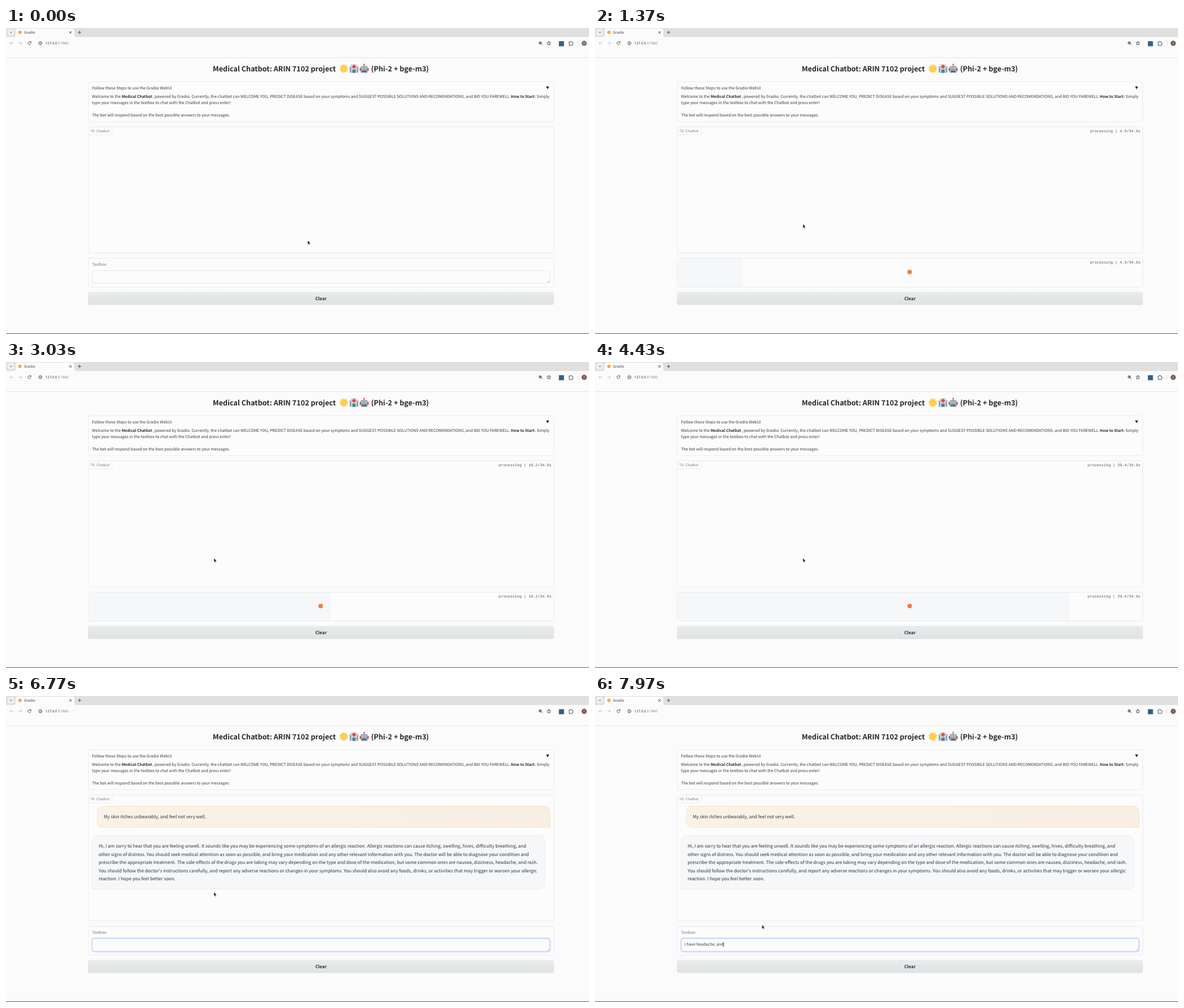
An HTML page for the animation above (8 s loop, 1032 by 543 pixels).

```html
<!DOCTYPE html>
<html lang="en">
<head>
<meta charset="utf-8">
<title>Medical Chatbot</title>
<style>
  html, body { margin: 0; width: 100%; height: 100%; overflow: hidden; background: #fbfbfb; }
  svg { display: block; width: 1032px; height: 543px; }
  text {
    font-family: "Noto Sans CJK SC", "Noto Sans CJK JP", "Noto Sans CJK", "Noto Sans", sans-serif;
    font-size: 7.04px; fill: #3a3a40; white-space: pre; text-rendering: geometricPrecision;
  }
  .ui { font-family: "Noto Sans", "Open Sans", sans-serif; }
  .bold { font-weight: 700; font-size: 6.75px; fill: #2b2b30; }
  .title { font-weight: 700; font-size: 12.62px; fill: #27272a; }
  .chat { font-size: 8.02px; fill: #303036; }
  .gray { fill: #74777f; }
  .mono { font-family: "Liberation Mono", "DejaVu Sans Mono", monospace; font-size: 6.78px; fill: #50525a; text-anchor: end; }
  .block { fill: #fcfcfc; stroke: #ebebee; }
  .line { fill: none; stroke: #45464a; stroke-linecap: round; stroke-linejoin: round; }
</style>
</head>
<body>
<svg viewBox="0 0 1032 543">
  <defs>
    <linearGradient id="btn" x2="0" y2="1">
      <stop stop-color="#e9ebec"/><stop offset="1" stop-color="#dfe2e3"/>
    </linearGradient>
    <linearGradient id="peach" x2="1" y2="0">
      <stop stop-color="#fbf2e7"/><stop offset="1" stop-color="#f8eee4"/>
    </linearGradient>
  </defs>
  <rect width="1032" height="543" fill="#fbfbfb"/>

  <!-- browser bar -->
  <rect width="1032" height="16" fill="#dfe0df"/>
  <path d="M14 16q3 0 3-3V5q0-4 4-4h96q4 0 4 4v8q0 3 3 3z" fill="#fbfbfb"/>
  <rect x="3" y="2" width="11" height="11" rx="3" fill="#f0f0ef"/>
  <path class="line" d="M7 7l1.7 1.7L10.4 7M112.3 6l3.6 3.6m0-3.6l-3.6 3.6M127.7 7.8h5m-2.5-2.5v5"/>
  <circle cx="24.7" cy="7.8" r="3" fill="#f5ac3c"/>
  <text class="ui" x="31.7" y="10.2" style="font-size:6.3px">Gradio</text>
  <g class="line" stroke-width=".9">
    <path d="M12.5 27H7.2m2.4-2.4L7.2 27l2.4 2.4M22.5 27h5.3m-2.4-2.4l2.4 2.4-2.4 2.4" style="stroke:#c0c0c6"/>
    <path d="M43.8 25.4a2.7 2.7 0 1 0 .3 2.4M44.2 24v1.8h-1.8"/>
    <circle cx="60.7" cy="27" r="2.8"/><path d="M60.7 26.7v1.6m0-2.8v.1"/>
    <circle cx="945.6" cy="26.4" r="2.2"/><path d="M947.3 28.1l2 2m-4.7-3.7h2m-1-1v2"/>
    <path d="M961 23.8l1 2.2 2.3.2-1.8 1.6.6 2.4-2.1-1.3-2.1 1.3.6-2.4-1.8-1.6 2.3-.2z"/>
    <path d="M996.8 25h1.8q0-1.6 1.2-1.6T1001 25h1.9v2q1.3 0 1.3 1t-1.3 1v2h-6.1v-1.7q1.2-.2 1.2-1.2t-1.2-1.2z"/>
  </g>
  <text class="ui" x="69.8" y="29.2" style="font-size:6.04px">127.0.0.1<tspan fill="#85858c">:7860</tspan></text>
  <rect x="978.7" y="23.4" width="9" height="9" fill="#2f6382"/>
  <path d="M1012.5 23v8" stroke="#dcdce6"/>
  <circle id="avatar" cx="1023.5" cy="27.2" r="4.6"/>
  <text class="ui" x="1023.5" y="29" text-anchor="middle" style="font-size:5px;fill:#d8cbc6">Z</text>
  <path d="M0 52.5h1032" stroke="#e3e3ea"/>
  <path d="M0 542.5h1032" stroke="#5c5c58"/>

  <!-- heading -->
  <text class="title" x="366" y="76.5">Medical Chatbot: ARIN 7102 project</text>
  <text class="title" x="748.6" y="76.5" text-anchor="end">(Phi-2 + bge-m3)</text>
  <g transform="translate(598 72)">
    <path id="rays" stroke="#f8b945" stroke-width="1.5" stroke-linecap="round"/>
    <path id="star" fill="#fdd53f" stroke="#fcc834" stroke-width="1.6" stroke-linejoin="round"/>
  </g>
  <g transform="translate(616 72)">
    <path d="M-7.8-2.600h15.600V7.600H-7.800z" fill="#b0bfc7"/>
    <path d="M-5.500-7.600h11V7.600h-11z" fill="#c8d3d8"/>
    <path d="M-7.800-3.400h2.300v1.600h-2.300zm13.300 0h2.300v1.600H5.500z" fill="#82969f"/>
    <path d="M-1.200-6.800h2.400v2.200h2.200v2.400H1.200V0h-2.400v-2.200h-2.200v-2.400h2.200z" fill="#e53935"/>
    <path d="M-6.900 0h1.600v2.200h-1.600zm0 3.600h1.600v2.200h-1.600zM5.300 0h1.600v2.200H5.300zm0 3.600h1.600v2.200H5.300zM-2.800 2h5.600v5.600h-5.600z" fill="#4c7f98"/>
  </g>
  <g transform="translate(634 72)">
    <path d="M0-7v3" stroke="#8197a2" stroke-width="1.4"/>
    <circle cy="-7" r="1.4" fill="#e5574f"/>
    <path d="M-8-1h16v5H-8z" fill="#c44f4a"/>
    <rect x="-6.2" y="-4.6" width="12.4" height="12.4" rx="2" fill="#90a4ae"/>
    <circle cx="-2.8" cy="-1" r="1.8" fill="#f3f7f8"/><circle cx="2.8" cy="-1" r="1.8" fill="#f3f7f8"/>
    <circle cx="-2.8" cy="-1" r=".9" fill="#d34b45"/><circle cx="2.8" cy="-1" r=".9" fill="#d34b45"/>
    <path d="M-3.8 4h7.6v2h-7.6z" fill="#455a64"/>
  </g>

  <!-- instructions -->
  <rect class="block" x="145.5" y="95.5" width="824" height="70.5" rx="4"/>
  <text x="152.3" y="108.5">Follow these Steps to use the Gradio WebUI</text>
  <path d="M956 103.8h5.4l-2.7 5z" fill="#202024"/>
  <text x="152.3" y="123.8">Welcome to the</text>
  <text class="bold" x="204.8" y="123.8">Medical Chatbot</text>
  <text x="259.4" y="123.8">, powered by Gradio. Currently, the chatbot can WELCOME YOU, PREDICT DISEASE based on your symptoms and SUGGEST POSSIBLE SOLUTIONS AND RECOMENDATIONS, and BID YOU FAREWELL.</text>
  <text class="bold" x="893.6" y="123.8">How to Start:</text>
  <text x="962" y="123.8" text-anchor="end">Simply</text>
  <text x="152.3" y="135">type your messages in the textbox to chat with the Chatbot and press enter!</text>
  <text x="152.3" y="157">The bot will respond based on the best possible answers to your messages.</text>

  <!-- chat panel -->
  <rect class="block" x="145.5" y="175.5" width="824" height="223.5" rx="4"/>
  <path class="block" d="M145.5 189.5v-10q0-4 4-4h38.5v10.5q0 3.5-3.5 3.5z"/>
  <path class="line" d="M150.7 180.5h4.6v3.2h-4.6zm1.3 1.6h2m1.3-.4h.9v3h-2.6" style="stroke:#a3a5ac" stroke-width=".6"/>
  <text class="gray" x="160.3" y="185" style="font-size:6.15px">Chatbot</text>
  <g id="talk">
    <path d="M173.5 195.5H951q12 0 12 12v25.5H173.5q-12 0-12-12v-13.5q0-12 12-12z" fill="url(#peach)" stroke="#f8e2c4"/>
    <text class="chat" x="173" y="217.2">My skin itches unbearably, and feel not very well.</text>
    <path d="M164.5 247.5H942q12 0 12 12V330.5q0 12-12 12H152.5v-83q0-12 12-12z" fill="#f5f7f8" stroke="#ebeff1"/>
  </g>

  <!-- input panel -->
  <rect class="block" x="145.5" y="408.5" width="824" height="51" rx="4"/>
  <g id="form">
    <text class="gray" x="152.3" y="422.3">Textbox</text>
    <rect id="halo" x="152" y="429.5" width="811.5" height="24.5" rx="4.5" fill="none" stroke="#dbe6f8" stroke-width="2.4"/>
    <rect id="field" x="152.5" y="430.5" width="810" height="22.5" rx="3.5" fill="#fcfcfd"/>
    <path d="M958.5 451.6l3-3m-1 3l1-1" stroke="#777980" stroke-width=".6"/>
    <text id="typed" x="158.5" y="443.4"></text>
    <path id="caret" stroke="#333" stroke-width=".8"/>
  </g>
  <g id="busy">
    <rect id="bar" x="145.5" y="409" height="50" rx="2" fill="#f5f7f8"/>
    <circle cx="557" cy="433" r="4" fill="#f0803a"/>
    <text class="mono" x="965.5" y="185"></text>
    <text class="mono" x="965.5" y="418"></text>
  </g>

  <rect x="145" y="468.5" width="825" height="23" rx="4" fill="url(#btn)"/>
  <text class="bold" x="557.5" y="483" text-anchor="middle" style="font-size:7.85px">Clear</text>
  <path id="mouse" d="M0 0v7.2l1.7-1.5 1.2 2.5 1.2-.6-1.2-2.4h2.3z" fill="#1b1b1f" stroke="#fff" stroke-width=".5"/>
</svg>
<script>
const $ = id => document.getElementById(id);
const LOOP = 8000, SEND = 757, REPLY = 6070, ETA = 34.9, SPEED = 8;
const first = 'My skin itches unbearably, and feel not very well.';
const second = 'I have headache, and';
const answer = [
  'Hi, I am sorry to hear that you are feeling unwell. It sounds like you may be experiencing some symptoms of an allergic reaction. Allergic reactions can cause itching, swelling, hives, difficulty breathing, and',
  'other signs of distress. You should seek medical attention as soon as possible, and bring your medication and any other relevant information with you. The doctor will be able to diagnose your condition and',
  'prescribe the appropriate treatment. The side-effects of the drugs you are taking may vary depending on the type and dose of the medication, but some common ones are nausea, dizziness, headache, and rash.',
  "You should follow the doctor's instructions carefully, and report any adverse reactions or changes in your symptoms. You should also avoid any foods, drinks, or activities that may trigger or worsen your allergic",
  'reaction. I hope you feel better soon.'
];
// time, x, y of the pointer
const route = [
  [0, 534, 377], [170, 335, 438], [220, 335, 438], [340, 368, 348],
  [7050, 368, 348], [7260, 290, 438], [7340, 290, 438], [7500, 295.5, 406]
];

answer.forEach((line, i) => {
  const el = document.createElementNS('http://www.w3.org/2000/svg', 'text');
  el.setAttribute('class', 'chat');
  el.setAttribute('x', 164);
  el.setAttribute('y', 269 + i * 14.55);
  el.textContent = line;
  $('talk').append(el);
});

const polar = (r, a) => `${r * Math.sin(a)} ${-r * Math.cos(a)}`;
const spokes = (n, f) => Array.from({ length: n }, (_, i) => f(i)).join('');
$('star').setAttribute('d', 'M' + spokes(10, i => (i ? 'L' : '') + polar(i % 2 ? 3.6 : 7, i * Math.PI / 5)) + 'z');
$('rays').setAttribute('d', spokes(5, i => {
  const a = (2 * i + 1) * Math.PI / 5;
  return `M${polar(4.5, a)}L${polar(7.6, a)}`;
}));

const show = (id, on) => $(id).setAttribute('visibility', on ? 'visible' : 'hidden');
const clamp = v => Math.max(0, Math.min(1, v));
const typing = (text, t, from, to) => text.slice(0, Math.round(text.length * clamp((t - from) / (to - from))));

function pointer(t) {
  let i = 0;
  while (i < route.length - 2 && t >= route[i + 1][0]) i++;
  const [a, x, y] = route[i], [b, u, v] = route[i + 1];
  const k = clamp((t - a) / (b - a)), e = k * k * (3 - 2 * k);
  return [x + (u - x) * e, y + (v - y) * e];
}

function draw(t) {
  const busy = t >= SEND && t < REPLY, done = t >= REPLY, focus = t >= 190;
  show('talk', done);
  show('busy', busy);
  show('form', !busy);
  $('halo').style.display = $('caret').style.display = focus ? '' : 'none';
  $('field').setAttribute('stroke', focus ? '#b9d0f2' : '#e5e6ec');
  $('avatar').setAttribute('fill', t < 30 ? '#77777a' : '#80594e');

  if (busy) {
    const sec = (t - SEND) * SPEED / 1000;
    $('bar').setAttribute('width', 824 * clamp(sec / ETA));
    document.querySelectorAll('.mono').forEach(el => {
      el.textContent = `processing | ${sec.toFixed(1)}/${ETA}s`;
    });
  } else {
    const text = done ? typing(second, t, 7530, 7940) : typing(first, t, 260, 735);
    $('typed').textContent = text;
    const x = 158.7 + (text ? $('typed').getComputedTextLength() : 0);
    $('caret').setAttribute('d', `M${x} 437v8.5`);
    if (!text && done) $('caret').style.display = 'none';
  }
  $('mouse').setAttribute('transform', `translate(${pointer(t)})`);
}

function tick(now) {
  draw(now % LOOP);
  requestAnimationFrame(tick);
}
draw(0);
requestAnimationFrame(tick);
</script>
</body>
</html>
```
